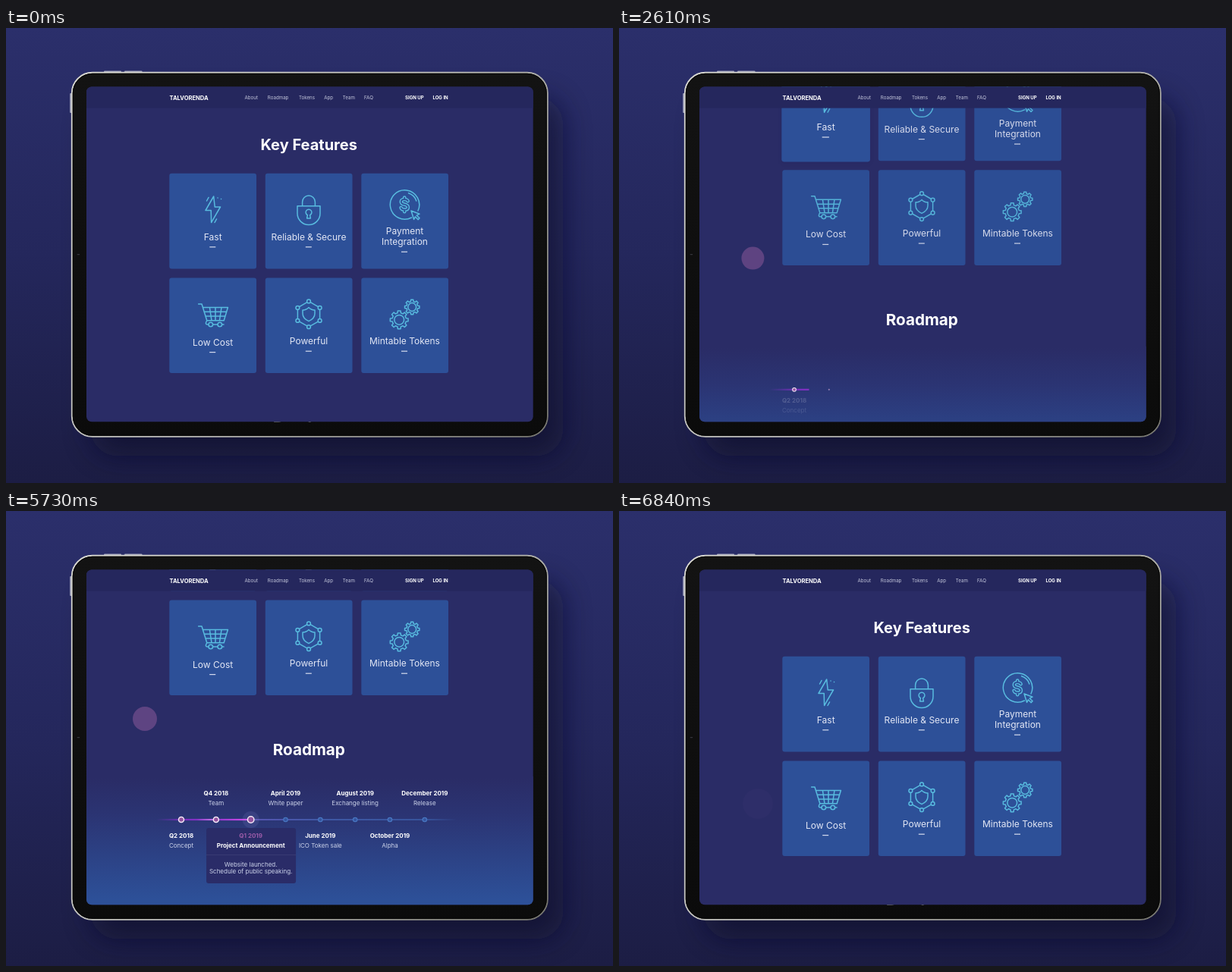
Animation of 800x600 px, one loop 7.23 s. Source, as an HTML page:

```html
<!DOCTYPE html>
<html lang="en">
<head>
<meta charset="utf-8">
<title>Key Features</title>
<style>
  html, body { margin: 0; width: 100%; height: 100%; overflow: hidden; background: #24265c; }
  svg { display: block; width: 800px; height: 600px; font-family: Inter, "Open Sans", sans-serif; }
  text { fill: #fff; white-space: pre; }
  .mid { text-anchor: middle; }
  .bold { font-weight: 700; }
  .label { font-size: 12px; fill: #e3e7f5; }
  .nav { font-size: 6.2px; fill: #c4c7dc; }
  .small { font-size: 8px; fill: #ccd3ea; }
  .date { font-size: 8px; font-weight: 700; }
  .desc { font-size: 6.05px; fill: #64b4dd; }
  .icon { fill: none; stroke: #58bbdf; stroke-width: 1.5; stroke-linejoin: round; stroke-linecap: round; }
  .icon .solid { fill: #2d5098; }
</style>
</head>
<body>
<svg id="stage" viewBox="0 0 800 600"></svg>
<script>
const LOOP = 7230, LAST = 6840, SCROLL = 212, LINE_Y = 407;
const CARD_W = 114.7, CARD_H = 125.7, FAST = [272.65, 254.65];

// ---------- drawing helpers ----------
const text = (x, y, s, cls, extra = '') => `<text x="${x}" y="${y}" class="${cls}" ${extra}>${s}</text>`;
const circle = (x, y, r, extra = '') => `<circle cx="${x}" cy="${y}" r="${r}" ${extra}/>`;
const rect = (x, y, w, h, extra = '') => `<rect x="${x}" y="${y}" width="${w}" height="${h}" ${extra}/>`;
const path = (d, extra = '') => `<path d="${d}" ${extra}/>`;
const group = (body, extra = '') => `<g ${extra}>${body}</g>`;
const icon = body => group(body, 'class="icon"');
const dash = (x, y, id = '') => rect(x - 4, y - .6, 8, 1.2, `fill="#d5dbee" ${id}`);

function gradient(id, box, stops) {
  const [x1, y1, x2, y2] = box;
  const list = stops.map(([at, color, alpha = 1]) =>
    `<stop offset="${at}" stop-color="${color}" stop-opacity="${alpha}"/>`).join('');
  return `<linearGradient id="${id}" gradientUnits="userSpaceOnUse" x1="${x1}" y1="${y1}" x2="${x2}" y2="${y2}">${list}</linearGradient>`;
}

function gear(cx, cy, root, tip, hole, teeth = 8) {
  const pts = [], step = Math.PI * 2 / teeth;
  for (let i = 0; i < teeth; i++) {
    for (const [f, r] of [[-.3, root], [-.2, tip], [.2, tip], [.3, root]]) {
      const a = (i + f) * step;
      pts.push((cx + r * Math.cos(a)).toFixed(2) + ' ' + (cy + r * Math.sin(a)).toFixed(2));
    }
  }
  return path('M' + pts.join('L') + 'Z') + circle(cx, cy, hole);
}

// ---------- icons ----------
const sparks = path('M267 223.5L264.5 228M277.5 252L275 256.5M279 224h.1M283.5 225.6h.1');
const bolt = icon(
  path('M273.7 222L263 240.5H270.2L270.6 256.5L282.5 236H275.2Z', 'id="bolt" pathLength="100"') +
  group(sparks, 'id="sparksA"') +
  group(sparks, 'id="sparksB" transform="translate(546 0) scale(-1 1)"'));

const padlock = icon(
  path('M384 234.8H414V244.5A15 15 0 0 1 384 244.5Z') +
  path('M390.6 234.5V229.5A8.4 8.4 0 0 1 407.4 229.5V234.5') +
  path('M397.4 246.6L396.6 251H401.4L400.6 246.6A3.9 3.9 0 1 0 397.4 246.6Z'));

const sign = 'M529.6 228.2Q528.6 226 525.4 226Q520.8 226 520.8 229.2Q520.8 231.8 525.2 232.6Q529.8 233.6 529.8 236.4Q529.8 239.6 525.2 239.6Q521.4 239.6 520.6 237M525.2 223.6V226M525.2 239.6V242.2';
const coin = icon(
  path('M534.5 250A19.2 19.2 0 1 1 543 241') +
  path('M530.5 217.8A16 16 0 0 1 540.8 228') +
  path(sign, 'stroke-width="4.6"') + path(sign, 'stroke="#2d5098" stroke-width="1.8"') +
  path('M534 241L545 245.2L541.2 247.2L545 250.6L543 252.6L539.4 248.9L537.6 252.4Z'));

const cart = icon(
  path('M253.6 364H258L264.8 385.8H287.2L292.4 368.5H259.6M261.4 374.3H290.5M263.1 380H288.9M268.4 368.5L271 385.8M276 368.5V385.8M284 368.5L281.4 385.8M264.8 385.8Q261.6 391 265.6 391H287') +
  [269.8, 281.8].map(x => circle(x, 391, 2.8, 'class="solid"')).join(''));

const corners = [[399, 360.4], [413.6, 368.9], [413.6, 385.9], [399, 394.2], [384.4, 385.9], [384.4, 368.9]];
const network = icon(
  path('M' + corners.map(c => c.join(' ')).join('L') + 'Z') +
  corners.map(([x, y]) => circle(x, y, 2.4, 'class="solid"')).join('') +
  path('M399 368.6Q402 372 407 372V376.5Q407 383 399 386.6Q391 383 391 376.5V372Q396 372 399 368.6Z'));

const gears = icon(gear(518.2, 384.8, 9.3, 12, 6.4) + gear(535.2, 368, 7.6, 9.8, 5.4));

// ---------- feature cards ----------
const plate = (x, y) => rect(x, y, CARD_W, CARD_H, 'rx="3" fill="#2d5098"');
const card = (x, y, body) => group(plate(x, y) + body, 'class="other"');
const label = (x, y, s) => text(x, y, s, 'label mid');

const description = ['Talvorenda represents a fork', 'that features faster block',
  'creation speed, increased total', 'supply and overall performance']
  .map((s, i) => text(FAST[0] - .5, 284.7 + i * 6.75, s, 'desc mid')).join('');

const fastCard = group(
  rect(215.3, 193.8, CARD_W, CARD_H, 'id="fastShadow" rx="3" fill="#15183f" filter="url(#soft)"') +
  plate(215.3, 191.8) +
  group(bolt + label(272.7, 279.8, 'Fast') + dash(272.3, 288.8, 'id="fastDash"'), 'id="fastTop"') +
  group(description, 'id="fastDesc"'), 'id="fast"');

const features =
  text(399.2, 160.8, 'Key Features', 'bold mid', 'font-size="20"') +
  card(341.8, 191.8, padlock + label(399, 279.8, 'Reliable &amp; Secure') + dash(398.8, 288.8)) +
  card(468.3, 191.8, coin + label(525.5, 272.4, 'Payment') + label(525.5, 286.2, 'Integration') + dash(525, 295.2)) +
  card(215.3, 329.4, cart + label(272.6, 418.6, 'Low Cost') + dash(272.2, 427.6)) +
  card(341.8, 329.4, network + label(399, 417, 'Powerful') + dash(398.8, 426.2)) +
  card(468.3, 329.4, gears + label(525.5, 417, 'Mintable Tokens') + dash(525, 426.2)) +
  fastCard;

// ---------- roadmap, laid out at its scrolled position ----------
const steps = [['Q2 2018', 'Concept'], ['Q4 2018', 'Team'], ['Q1 2019', ''], ['April 2019', 'White paper'],
  ['June 2019', 'ICO Token sale'], ['August 2019', 'Exchange listing'],
  ['October 2019', 'Alpha'], ['December 2019', 'Release']];
const stepX = i => 231 + i * 45.83;
const isUpper = i => i % 2 === 1;
const Q1 = stepX(2);

const stepText = ([date, name], i) => {
  const x = stepX(i), y = isUpper(i) ? 375 : 431.4;
  const more = i === 2
    ? group(text(x, 444, 'Project', 'small mid') + text(x, 453, 'Announcement', 'small mid'), 'id="brief"') +
      text(x, y, date, 'date mid', 'id="litDate" style="fill:#9a5ba8"')
    : text(x, y + 12.5, name, 'small mid');
  return group(text(x, y, date, 'date mid', i === 2 ? 'id="plainDate"' : '') + more, 'class="step"');
};

const knob = (_, i) => group(
  i < 3 ? circle(0, 0, i === 2 ? 4.2 : 3.5, 'fill="#92549f" stroke="#f3e6f6" stroke-width="1.5"')
        : circle(0, 0, 2.7, 'fill="#34549f" stroke="#4876c0" stroke-width="1.2"'), 'class="knob"');

const roadmap = group(
  rect(106, 350, 589, 420, 'fill="url(#dusk)"') +
  text(399.3, 322.4, 'Roadmap', 'bold mid', 'font-size="20.7"') +
  group(
    rect(Q1, LINE_Y - .7, 272, 1.4, 'fill="url(#ahead)"') +
    rect(198, LINE_Y - 1.1, Q1 - 198, 2.2, 'fill="url(#done)"') +
    rect(-14, LINE_Y - 1, 28, 2, 'id="glint" fill="url(#shine)"'), 'clip-path="url(#reveal)"') +
  circle(Q1, LINE_Y, 5, 'id="pulse" fill="#8b8fd0"') +
  steps.map(knob).join('') +
  rect(264, 418, 118, 73, 'id="panel" rx="3" fill="#2a2c68"') +
  steps.map(stepText).join('') +
  group(
    rect(264, 453.2, 118, .8, 'fill="#fff" opacity=".09"') +
    text(Q1, 444, 'Project Announcement', 'date mid') +
    text(Q1, 469.4, 'Website launched.', 'small mid') +
    text(Q1, 478.4, 'Schedule of public speaking.', 'small mid'), 'id="details"'),
  `transform="translate(0 ${SCROLL})"`);

// ---------- header and tablet ----------
const nav = [['About', 314.5], ['Roadmap', 344.8], ['Tokens', 386], ['App', 419.2], ['Team', 443.8], ['FAQ', 472]];
const header = rect(106, 77, 589, 28.6, 'fill="#25275d"') +
  text(215.5, 94.8, 'TALVORENDA', 'bold', 'font-size="7.6"') +
  nav.map(([s, x]) => text(x, 94.2, s, 'nav')).join('') +
  text(526, 94.2, 'SIGN UP', 'bold', 'font-size="6.1"') +
  text(562.4, 94.2, 'LOG IN', 'bold', 'font-size="6.1"');

const tablet =
  rect(112, 92, 622, 472, 'rx="34" fill="#0d0e2c" opacity=".62" filter="url(#shadow)"') +
  rect(129, 56.4, 23, 3, 'rx="1" fill="#a3a6bd"') + rect(156, 56.4, 23.5, 3, 'rx="1" fill="#a3a6bd"') +
  rect(84.2, 86, 3, 26, 'rx="1" fill="#a3a6bd"') +
  rect(86.8, 58.8, 627, 480, 'rx="27" fill="url(#bezel)" stroke="url(#metal)" stroke-width="1.9"') +
  rect(88.3, 60.3, 624, 477, 'rx="25.5" fill="none" stroke="#050505" stroke-width="1"') +
  rect(93.6, 298, 3.6, 1.3, 'rx=".6" fill="#34353c"') +
  rect(106, 77.5, 588.7, 441.8, 'rx="7" fill="#2a2c66"');

const stage = document.getElementById('stage');
stage.innerHTML = `<defs>
  ${gradient('back', [0, 0, 0, 600], [[0, '#2b2f6b'], [.5, '#24275c'], [1, '#1c1d44']])}
  ${gradient('bezel', [0, 58, 0, 539], [[0, '#131313'], [1, '#0b0b0b']])}
  ${gradient('metal', [86, 58, 714, 539], [[0, '#d9d9d2'], [.5, '#bdbdb8'], [1, '#77776f']])}
  ${gradient('dusk', [0, 352, 0, 512], [[0, '#2a2c66'], [.3, '#2b3473'], [1, '#2d5098']])}
  ${gradient('done', [198, 0, Q1, 0], [[0, '#6b2fb4', 0], [.3, '#7a2fbe'], [.62, '#8f36cc'], [1, '#d64fec']])}
  ${gradient('ahead', [Q1, 0, 594, 0], [[0, '#6a62cc'], [.35, '#4766b8'], [.85, '#3c60ac'], [1, '#3c60ac', 0]])}
  ${gradient('shine', [-14, 0, 14, 0], [[0, '#f2b4ff', 0], [.7, '#f2b4ff', .5], [1, '#f2b4ff', 0]])}
  <clipPath id="screen">${rect(106, 77.5, 588.7, 441.8, 'rx="7"')}</clipPath>
  <clipPath id="reveal">${rect(190, 395, 0, 24, 'id="revealBox"')}</clipPath>
  <filter id="shadow" x="-20%" y="-20%" width="140%" height="140%"><feGaussianBlur stdDeviation="18"/></filter>
  <filter id="soft" x="-20%" y="-20%" width="140%" height="140%"><feGaussianBlur stdDeviation="3"/></filter>
  </defs>` +
  rect(0, 0, 800, 600, 'fill="url(#back)"') + tablet +
  group(group(features + roadmap, 'id="page"') + header +
    circle(0, 0, 15, 'id="touch" fill="#c874b8"'), 'clip-path="url(#screen)"');

// ---------- motion ----------
const el = {};
stage.querySelectorAll('[id]').forEach(n => el[n.id] = n);
const all = cls => [...stage.querySelectorAll('.' + cls)];
const others = all('other'), stepNodes = all('step'), knobs = all('knob');
const set = (node, attrs) => { for (const k in attrs) node.setAttribute(k, attrs[k]); };

const span = (t, start, length) => Math.min(1, Math.max(0, (t - start) / length));
const mix = (a, b, p) => a + (b - a) * p;

function bezier(x1, y1, x2, y2) {
  const at = (a, b, s) => 3 * (1 - s) * (1 - s) * s * a + 3 * (1 - s) * s * s * b + s * s * s;
  return x => {
    if (x <= 0 || x >= 1) return x;
    let lo = 0, hi = 1;
    for (let i = 0; i < 24; i++) {
      const m = (lo + hi) / 2;
      if (at(x1, x2, m) < x) lo = m; else hi = m;
    }
    return at(y1, y2, lo);
  };
}
const glide = bezier(.2, .2, .3, 1), swell = bezier(.65, 0, .35, 1), smooth = bezier(.4, 0, .6, 1);

// Each drag: press, move, release.
const drags = [
  { x: 176.4, from: 381, to: 265.5, press: 2160, move: 2340 },
  { x: 183, from: 274, to: 386, press: 5585, move: 5815 }
];
const MOVE = 720, RELEASE = 330;
const moved = (d, t) => glide(span(t, d.move, MOVE));

function drawTouch(t) {
  const d = drags[t < 4500 ? 0 : 1];
  const down = smooth(span(t, d.press, 210));
  const up = span(t, d.move + MOVE, RELEASE);
  set(el.touch, {
    cx: d.x, cy: mix(d.from, d.to, moved(d, t)),
    r: 20 - 5 * down + 5 * glide(up),
    opacity: .33 * span(t, d.press - 60, 150) * (1 - up)
  });
}

function drawFast(t) {
  const h = swell(span(t, 330, 1120)) * (1 - glide(span(t, 2370, 450)));
  const [x, y] = FAST, scale = 1 + .108 * h;
  set(el.fast, { transform: `translate(${x} ${y}) scale(${scale}) translate(${-x} ${-y})` });
  set(el.fastTop, { transform: `translate(0 ${-20 * h})` });
  set(el.fastDash, { x: 272.3 - 4 - 3.4 * h, width: 8 + 6.8 * h });
  set(el.fastDesc, { opacity: span(h, .5, .5) });
  set(el.fastShadow, { opacity: .5 * h });
  set(el.bolt, {
    'stroke-dasharray': h ? `${25 - 5 * h} ${5 * h}` : 'none',
    'stroke-dashoffset': -(t - 330) * .03
  });
  set(el.sparksA, { opacity: 1 - h });
  set(el.sparksB, { opacity: h });
  others.forEach(n => set(n, { opacity: 1 - .4 * h }));
}

function drawRoadmap(t) {
  set(el.revealBox, { width: Math.max(0, 60 + (t - 2610) * .48) });
  knobs.forEach((n, i) => {
    const s = glide(span(t, 2520 + i * 95 - (i ? 35 : 0), 240));
    set(n, { transform: `translate(${stepX(i)} ${LINE_Y}) scale(${s})` });
  });
  stepNodes.forEach((n, i) => {
    const p = span(t, 2540 + i * 96, 400);
    const shift = 12 * Math.pow(1 - p, 2.8) * (isUpper(i) ? 1 : -1);
    set(n, { opacity: p, transform: `translate(0 ${shift})` });
  });

  const beat = t < 3360 ? 1 : span((t - 3360) % 1100, 0, 750);
  const grow = 1 - Math.pow(1 - beat, 2);
  set(el.pulse, { r: 5 + 15 * grow, opacity: .4 * Math.pow(1 - beat, 4) });
  const run = t < 3360 ? 1 : ((t - 3360 + 250) % 1100) / 1100;
  set(el.glint, { transform: `translate(${mix(236, Q1 - 10, run)} 0)`, opacity: Math.sin(Math.PI * run) });
}

function drawPanel(t) {
  const k = smooth(span(t, 4500, 480)) * (1 - smooth(span(t, 5790, 270)));
  const w = mix(59, 118, k);
  set(el.panel, { x: Q1 + .4 - w / 2, width: w, height: mix(36, 73, k), opacity: span(k, 0, .4) });
  set(el.details, { opacity: span(k, .4, .6) });
  set(el.brief, { opacity: 1 - span(k, 0, .5) });
  set(el.litDate, { opacity: k });
  set(el.plainDate, { opacity: 1 - k });
}

function render(now) {
  const t = Math.min(now % LOOP, LAST);
  const y = SCROLL * (moved(drags[0], t) - moved(drags[1], t));
  set(el.page, { transform: `translate(0 ${-y})` });
  drawFast(t);
  drawRoadmap(t);
  drawPanel(t);
  drawTouch(t);
}

const begin = performance.now();
function tick() {
  render(performance.now() - begin);
  requestAnimationFrame(tick);
}
tick();
</script>
</body>
</html>
```
